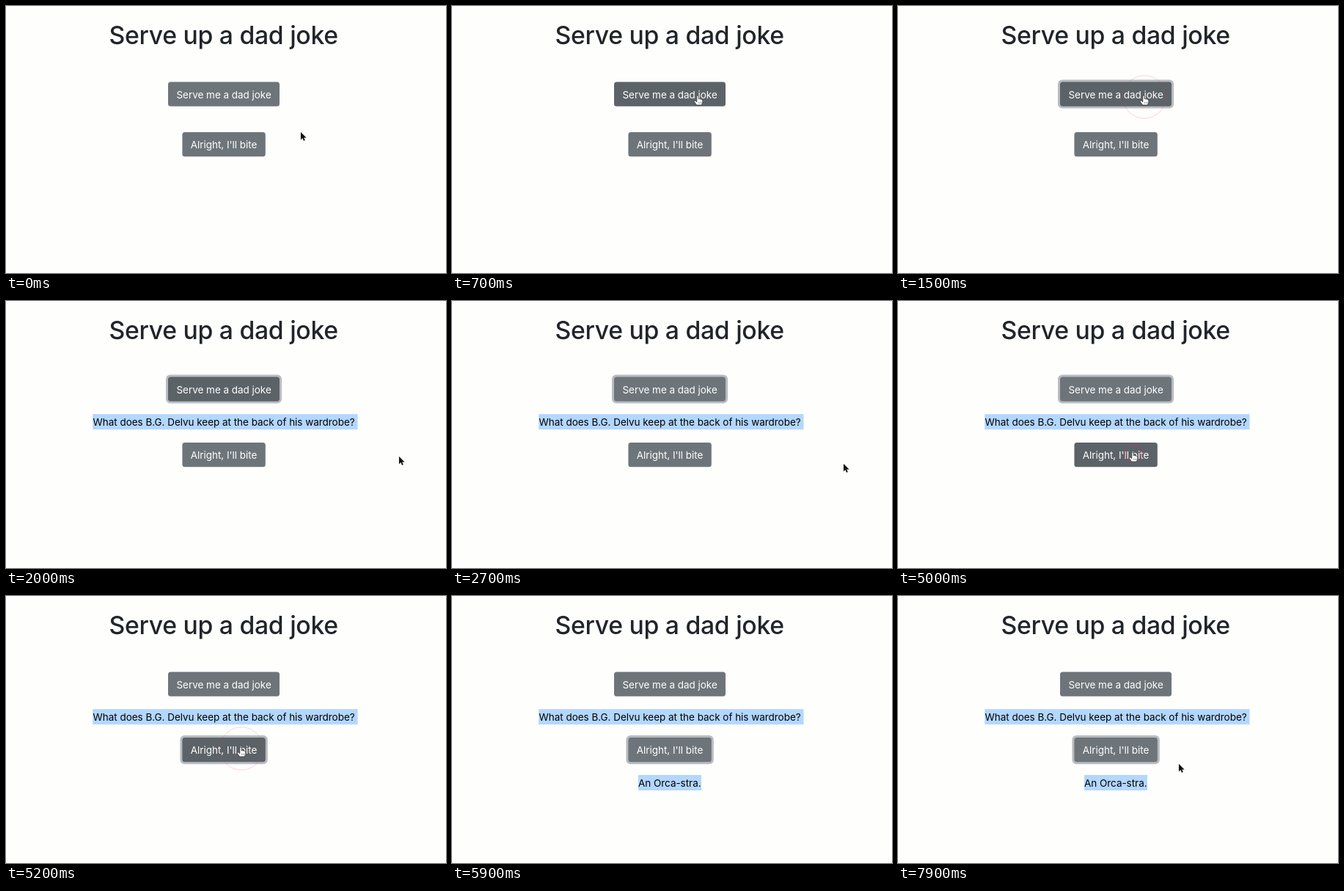
An HTML page for the animation above (8000 ms loop, 600 px wide and 364 px high).

```html
<!DOCTYPE html>
<html lang="en">
<head>
<meta charset="utf-8">
<title>Serve up a dad joke</title>
<style>
  html, body { margin: 0; width: 100%; height: 100%; overflow: hidden; background: #fefefd; }
  svg { display: block; width: 600px; height: 364px; }
  text {
    font: 400 13.48px Inter, "Liberation Sans", sans-serif;
    font-optical-sizing: none;
    letter-spacing: -0.02px;
    white-space: pre;
  }
  .title { font-size: 33.75px; font-weight: 500; letter-spacing: -0.29px; fill: #212529; }
  .label { fill: #fff; }
  .mark { fill: #b3d7ff; }
  .focus { fill: #b8bcc0; }
</style>
</head>
<body>
<svg viewBox="0 0 600 364">
  <text class="title" x="140.5" y="52">Serve up a dad joke</text>

  <g id="serve">
    <rect class="focus" x="218" y="100.5" width="158" height="39" rx="6"/>
    <rect class="face" x="221" y="103.5" width="152" height="33.2" rx="3.5"/>
    <text class="label" x="232.5" y="125.5">Serve me a dad joke</text>
  </g>

  <g id="question">
    <rect class="mark" x="118.2" y="154.2" width="361.3" height="21"/>
    <text x="118.6" y="170.4">What does B.G. Delvu keep at the back of his wardrobe?</text>
  </g>

  <g id="bite">
    <rect class="focus" x="237.4" y="169.1" width="119.4" height="39.2" rx="6"/>
    <rect class="face" x="240.4" y="172.1" width="113.4" height="33.2" rx="3.5"/>
    <text class="label" x="251.8" y="194">Alright, I'll bite</text>
  </g>

  <g id="answer">
    <rect class="mark" x="254" y="244" width="86" height="21"/>
    <text x="254" y="259.6">An Orca-stra.</text>
  </g>

  <circle id="ring" fill="none" stroke="#d8344c"/>

  <g id="arrow">
    <path d="M0 0V11.2L2.6 8.8L4.3 12.8L6.2 12L4.5 8.1H8.1Z" transform="scale(.92)"
      fill="#111" stroke="#ddd" stroke-linejoin="round" paint-order="stroke"/>
  </g>
  <g id="hand">
    <path d="M-1.2 .6Q0 -.8 1.2 .6V4.6Q2.4 3.8 3.2 5Q4.5 4.4 5.2 5.6Q6.6 5.2 6.8 6.8V9.2L5.4 13H-1.4L-4.6 8.6Q-5.4 6.8 -3.6 6.9L-1.2 8.6Z"
      fill="#fff" stroke="#333" stroke-width=".8" stroke-linejoin="round"/>
    <path d="M1.2 8.6V11M3.1 8.6V11M4.9 8.6V11" stroke="#666" stroke-width=".6"/>
  </g>
</svg>
<script>
  const LOOP = 8000, STEP = 100;
  const $ = id => document.getElementById(id);

  const home = { x: 402, y: 172 };
  const moves = [
    { at: 0, for: 500, x: 335, y: 122 },
    { at: 1800, for: 200, x: 536, y: 212 },
    { at: 2000, for: 500, x: 534, y: 222 },
    { at: 3500, for: 400, x: 526, y: 224 },
    { at: 3900, for: 400, x: 320, y: 206 },
    { at: 5400, for: 200, x: 455, y: 340 },
    { at: 7700, for: 200, x: 383, y: 229 }
  ];
  const clicks = [1200, 4900];

  const ramp = (t, start, length) => Math.min(1, Math.max(0, (t - start) / length));
  const ease = k => k * k * (3 - 2 * k);
  const pulse = (t, on, off) => ramp(t, on, 200) - ramp(t, off, 200);
  const show = (id, on) => $(id).setAttribute("visibility", on ? "visible" : "hidden");
  const set = (id, attrs) => {
    for (const name in attrs) $(id).setAttribute(name, attrs[name]);
  };

  function tipAt(t) {
    return moves.reduce((p, m) => {
      const k = ease(ramp(t, m.at, m.for));
      return { x: p.x + (m.x - p.x) * k, y: p.y + (m.y - p.y) * k };
    }, home);
  }

  function isOver(id, { x, y }) {
    const box = $(id).querySelector(".face").getBoundingClientRect();
    return x > box.left && x < box.right && y > box.top && y < box.bottom;
  }

  function paintButton(id, hover, focus) {
    const shade = 18 * hover;
    const face = [110, 117, 122].map(c => Math.round(c - shade));
    $(id).querySelector(".face").setAttribute("fill", `rgb(${face})`);
    $(id).querySelector(".focus").setAttribute("opacity", focus);
  }

  function draw(t) {
    const asked = t >= 1800;
    show("question", asked);
    show("answer", t >= 5500);
    set("bite", { transform: `translate(0 ${asked ? 21 : 0})` });
    paintButton("serve", pulse(t, 200, 2000), pulse(t, clicks[0], 5000));
    paintButton("bite", pulse(t, 4200, 5500), pulse(t, 5000, LOOP));

    const tip = tipAt(t);
    const click = clicks.find(c => t >= c && t < c + 400);
    show("ring", click);
    if (click) {
      const k = (t - click) / 400;
      set("ring", { cx: tip.x + 1, cy: tip.y + 2, r: 3 + 35 * k, opacity: 0.8 * (1 - k) });
    }

    const seen = t < 5700 || t >= 7800;
    const hand = isOver("serve", tip) || isOver("bite", tip);
    const transform = `translate(${tip.x} ${tip.y})`;
    set("arrow", { transform });
    set("hand", { transform });
    show("arrow", seen && !hand);
    show("hand", seen && hand);
  }

  const start = performance.now();
  function tick() {
    const t = (performance.now() - start) % LOOP;
    draw(Math.floor(t / STEP) * STEP);
    requestAnimationFrame(tick);
  }
  tick();
</script>
</body>
</html>
```
